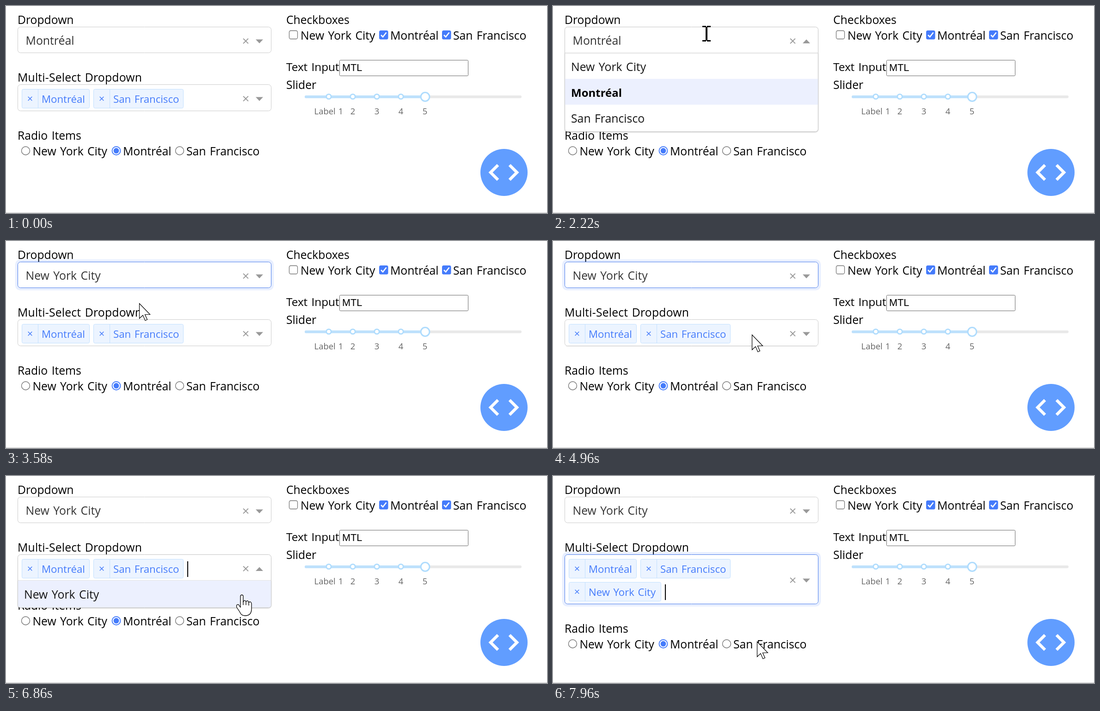
An HTML page with a canvas for the animation above (8 s loop, 1170x449 px).

```html
<!DOCTYPE html>
<html lang="en">
<head>
<meta charset="utf-8">
<title>Form controls</title>
<style>
html, body { margin: 0; width: 100%; height: 100%; overflow: hidden; background: #fff; }
canvas { display: block; }
</style>
</head>
<body>
<canvas id="stage" width="1170" height="449"></canvas>
<script>
const ctx = document.getElementById('stage').getContext('2d');
const LOOP = 8000;
const BLUE = '#447bfb';
const SANS = '"Open Sans", "Noto Sans", sans-serif';
const CITIES = ['New York City', 'Montréal', 'San Francisco'];

// Pointer moves: start, end, number of steps, destination
const START = [378, 437];
const MOVES = [
  [660, 1140, 8, 332, 72],
  [1340, 1480, 3, 332, 60],
  [2750, 3440, 11, 288, 135],
  [4110, 4890, 12, 430, 203],
  [5090, 5510, 7, 554, 198],
  [6170, 6790, 10, 510, 258],
  [6930, 6930, 1, 530, 286],
  [7410, 7410, 1, 624, 298],
  [7610, 7680, 2, 540, 222],
  [7820, 7960, 3, 441, 359]
];

const between = (t, a, b) => t >= a && t < b;
const blink = (t, start, half) => Math.floor((t - start) / half) % 2 === 0;

function pointerAt(t) {
  let [x, y] = START;
  for (const [t0, t1, n, toX, toY] of MOVES) {
    if (t < t0) break;
    const gap = (t1 - t0) / (n - 1) || 1;
    const p = Math.min(n, Math.floor((t - t0) / gap + 0.001) + 1) / n;
    x += (toX - x) * p;
    y += (toY - y) * p;
  }
  return { x, y };
}

function stateAt(t) {
  const s = {
    open1: between(t, 1690, 3580),
    focus1: between(t, 1620, 1690) || between(t, 3580, 5580),
    open2: between(t, 5650, 6930),
    focus2: t >= 6930,
    value: t < 3580 ? CITIES[1] : CITIES[0],
    click: between(t, 1550, 1830) || between(t, 5580, 5780),
    pointer: t >= 660 ? pointerAt(t) : null,
    shift: t >= 6930 ? 50 : 0
  };
  s.caret1 = s.open1 && blink(t, 1690, 530);
  s.caret2 = t >= 5650 && blink(t, 5650, 520);
  return s;
}

function text(str, x, y, { size = 24.7, color = '#000', weight = 400, family = SANS, align = 'left', track = 0 } = {}) {
  ctx.font = `${weight} ${size}px ${family}`;
  ctx.letterSpacing = track + 'px';
  ctx.wordSpacing = size * 0.08 + 'px';
  ctx.textAlign = align;
  ctx.fillStyle = color;
  ctx.fillText(str, x, y);
}

function box(x, y, w, h, r, fill, stroke, line = 1) {
  ctx.beginPath();
  ctx.roundRect(x, y, w, h, r);
  paint(fill, stroke, line);
}

function disc(x, y, r, fill, stroke, line) {
  ctx.beginPath();
  ctx.arc(x, y, r, 0, Math.PI * 2);
  paint(fill, stroke, line);
}

function paint(fill, stroke, line) {
  if (fill) { ctx.fillStyle = fill; ctx.fill(); }
  if (stroke) { ctx.strokeStyle = stroke; ctx.lineWidth = line; ctx.stroke(); }
}

function rect(x, y, w, h, color) {
  ctx.fillStyle = color;
  ctx.fillRect(x, y, w, h);
}

function poly(points, { fill, stroke, line = 1, closed = true }) {
  ctx.beginPath();
  points.forEach(([x, y]) => ctx.lineTo(x, y));
  if (closed) ctx.closePath();
  paint(fill, stroke, line);
}

function cross(x, y, r, color, line) {
  ctx.beginPath();
  ctx.moveTo(x - r, y - r);
  ctx.lineTo(x + r, y + r);
  ctx.moveTo(x + r, y - r);
  ctx.lineTo(x - r, y + r);
  paint(null, color, line);
}

function control(y, h, { open, focus, hover }) {
  const corners = open ? [6, 6, 0, 0] : 6;
  if (focus) box(22.5, y - 2.5, 554, h + 5, 8, null, 'rgba(68,123,251,0.12)', 5);
  else if (hover) rect(28, y + h, 543, 1, 'rgba(0,0,0,0.08)');
  box(25.5, y + 0.5, 548, h - 1, corners, '#fff', focus ? '#4a7ceb' : open ? '#c4c4c4' : '#ccc');
  const mid = y + Math.floor((h + 5) / 2);
  cross(518.5, mid, 5.4, '#999', 2);
  const [base, tip] = open ? [mid + 5, mid - 3.5] : [mid - 3.5, mid + 5];
  poly([[540, base], [556, base], [548, tip]], { fill: '#999' });
}

function menu(y, options, active, chosen) {
  const rows = options.length;
  const h = rows > 1 ? 171 : 59;
  ctx.save();
  ctx.shadowColor = 'rgba(0,0,0,0.18)';
  ctx.shadowBlur = 2;
  ctx.shadowOffsetY = 1;
  box(25.5, y - 0.5, 548, h, [0, 0, 6, 6], '#fff', '#ccc');
  ctx.restore();
  options.forEach((name, i) => {
    const top = y + i * 56;
    if (i === active) {
      const last = i === rows - 1;
      box(26, top, 547, last ? 58 : 56, last ? [0, 0, 5, 5] : 0, '#ecf0fe');
    }
    const bold = i === chosen;
    text(name, 39, top + 39, bold ? { weight: 700, size: 24 } : { color: '#151515', size: 24.8 });
  });
  rect(26, y - 1, 547, 1, '#e4e4e4');
}

function tag(name, x, y, w) {
  box(x + 0.5, y + 0.5, w - 1, 41, 3, '#ecf4ff', '#c2e0ff');
  rect(x + 35, y + 1, 1, 40, '#c2e0ff');
  cross(x + 18, y + 21, 4.3, BLUE, 1.5);
  text(name, x + 43, y + 30, { size: 22.2, color: BLUE });
}

function radios(y) {
  text('Radio Items', 25, y);
  [42.5, 238.5, 375.5].forEach((x, i) => {
    const on = i === 1;
    disc(x, y + 24, 9, '#fff', on ? BLUE : '#767676', on ? 1.9 : 1.4);
    if (on) disc(x, y + 24, 5.9, BLUE);
    text(CITIES[i], [57.5, 253, 390][i], y + 34);
  });
}

function checks() {
  text('Checkboxes', 606, 39);
  [612, 807, 943].forEach((x, i) => {
    if (i) {
      box(x, 53, 19.5, 19.5, 3.5, BLUE);
      poly([[x + 4, 63], [x + 8, 67], [x + 15.5, 57.5]], { stroke: '#fff', line: 2.6, closed: false });
    } else {
      box(x + 0.5, 53.5, 18, 18, 3.5, '#fff', '#767676', 1.3);
    }
    text(CITIES[i], [637, 831, 967][i], 73);
  });
}

function slider() {
  text('Slider', 606, 180);
  box(646, 194, 469, 6, 3, '#e9e9e9');
  box(646, 194, 261, 6, 3, '#bee1fc');
  for (let i = 0; i < 5; i++) {
    const x = 698 + i * 52;
    if (i < 4) disc(x, 196.5, 5.2, '#fff', '#afdcfd', 2.8);
    text(i ? String(i + 1) : 'Label 1', x, 235, { size: 18.4, color: '#666', align: 'center' });
  }
  disc(906.5, 197, 9.4, '#fff', '#afdcfd', 3);
}

function codeButton() {
  disc(1077, 361, 51, '#619dff');
  for (const side of [-1, 1]) {
    const x = 1076.5 + side * 12.5;
    poly([[x, 345], [x + side * 16, 361], [x, 377]], { stroke: '#fff', line: 6.4, closed: false });
  }
}

function arrow() {
  poly([[0.5, 0.5], [0.5, 33], [8, 26], [13, 37.5], [17.5, 35.5], [12.5, 24.5], [23.5, 24.5]],
    { fill: '#fff', stroke: '#000', line: 1.2 });
}

function beam() {
  rect(-2, -15, 4, 30, '#000');
  for (const y of [-17, 14]) {
    rect(-9, y, 8, 3, '#000');
    rect(1, y, 8, 3, '#000');
  }
}

function hand() {
  const outline = new Path2D('M-3 3Q-3 0 0 0Q3 0 3 3V15Q6 9 9 14.5Q13 10 15 16Q20 13 21 19V30C21 40 17 45 7 45C0 45-2 42-5 36L-11 27Q-13 20-7 21L-3 27Z');
  ctx.lineWidth = 1.3;
  ctx.lineJoin = 'round';
  ctx.fillStyle = '#fff';
  ctx.strokeStyle = '#000';
  ctx.fill(outline);
  ctx.stroke(outline);
  ctx.stroke(new Path2D('M3 14V22M9 14.5V22M15 16V23'));
}

function pointerShape({ x, y }, s) {
  if (x > 25 && x < 574) {
    if (between(y, 45, 102)) return beam;
    if (s.open1 && between(y, 102, 272)) return hand;
    if (s.open2 && between(y, 227, 286)) return hand;
    if (x > 500 && between(y, 170, 228 + s.shift)) return hand;
  }
  return arrow;
}

function draw(t) {
  const s = stateAt(t);
  const p = s.pointer;
  const hovers = (top, bottom) => Boolean(p) && p.x < 574 && between(p.y, top, bottom);
  rect(0, 0, 1170, 449, '#fff');
  rect(0, 448, 1170, 1, '#c8c8c8');

  checks();
  text('Text Input', 606, 141, { size: 24.3 });
  box(721.5, 117.5, 278, 34, 2, '#fff', '#6b6b6b');
  text('MTL', 727, 141, { size: 21.67, family: '"Liberation Sans", Arial, sans-serif' });
  slider();
  codeButton();

  text('Dropdown', 25, 39);
  text('Multi-Select Dropdown', 25, 164, { track: 0.22 });
  radios(290 + s.shift);

  control(170, 58 + s.shift, { open: s.open2, focus: s.focus2, hover: hovers(170, 228) });
  tag(CITIES[1], 34, 180, 147);
  tag(CITIES[2], 189, 180, 195);
  if (s.shift) tag(CITIES[0], 34, 230, 200);
  if (s.caret2) rect(s.shift ? 242 : 392, 185 + s.shift, 2, 34, '#000');
  if (s.open2) menu(227, [CITIES[0]], 0);

  control(45, 57, { open: s.open1, focus: s.focus1, hover: hovers(45, 102) });
  text(s.value, 42.5, 84, { color: '#333', size: 24.8 });
  if (s.caret1) rect(42, 59, 2, 34, '#000');
  if (s.open1) menu(102, CITIES, p.y >= 102 ? Math.floor((p.y - 102) / 56) : 1, 1);

  if (!p) return;
  if (s.click) disc(p.x, p.y - 1, 24, 'rgba(251,246,65,0.68)');
  ctx.save();
  ctx.translate(Math.round(p.x), Math.round(p.y));
  pointerShape(p, s)();
  ctx.restore();
}

const began = performance.now();
function tick() {
  draw((performance.now() - began) % LOOP);
  requestAnimationFrame(tick);
}
tick();
</script>
</body>
</html>
```
